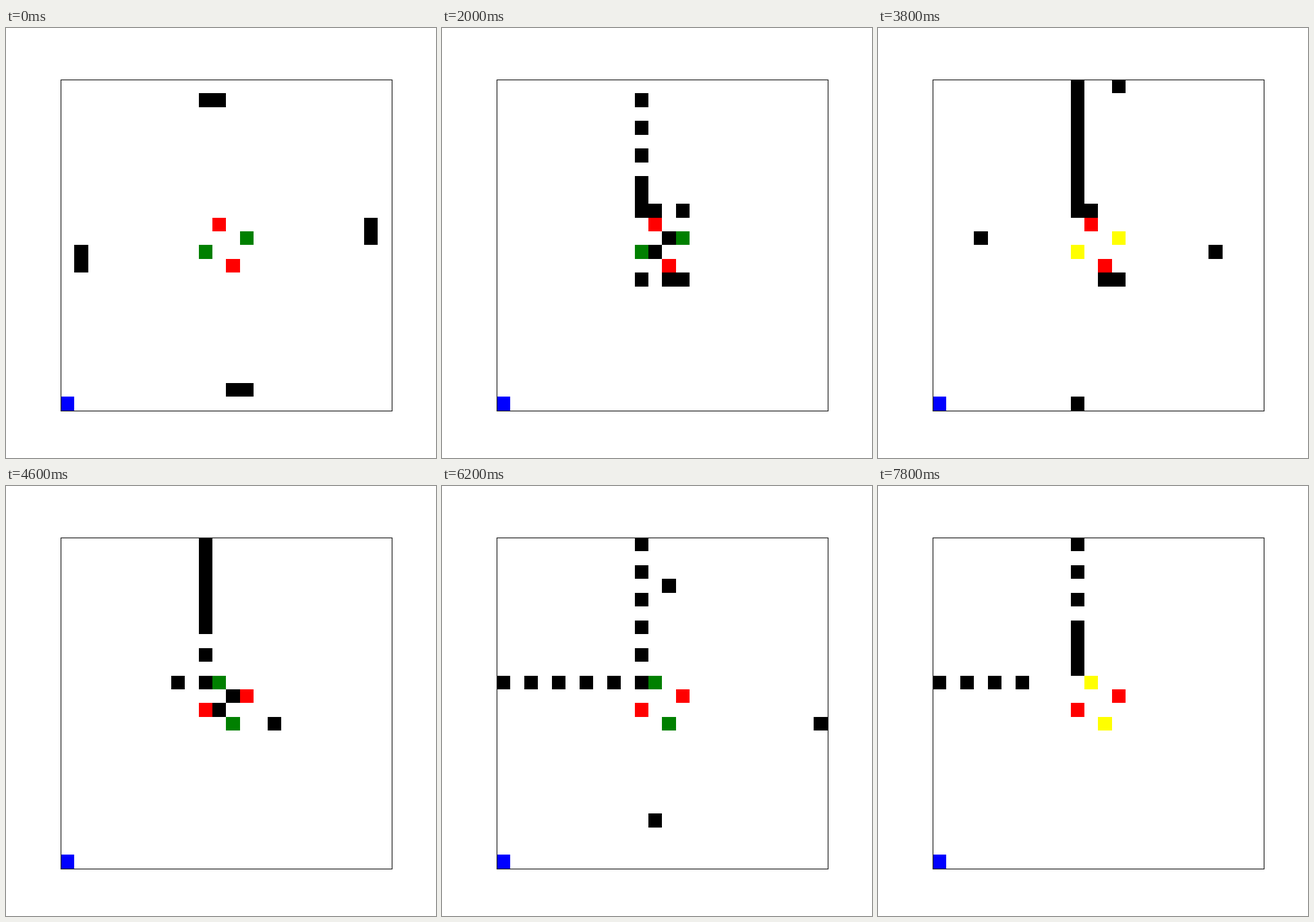
Recreate the animation shown at these times as a matplotlib script. Size 700x700 px, loop 8000 ms.

```python
import numpy as np
import matplotlib.pyplot as plt
from matplotlib.animation import FuncAnimation
from matplotlib.colors import ListedColormap

N = 24              # cells per side
STEPS = 40
STOP = 9            # last cell before the crossing
HALF, GREEN_TIME = 20, 15

COLORS = ["white", "black", "red", "yellow", "green", "blue"]
EMPTY, CAR, RED, YELLOW, GREEN, MARK = range(len(COLORS))


def rotate(cell, turns):
    x, y = cell
    for _ in range(turns):
        x, y = N - 1 - y, x
    return x, y


# Lanes for traffic entering from the top; the other arms are rotations.
STRAIGHT = [(11, i) for i in range(N)]
TURN = [(10, i) for i in range(11)] + [(i, 10) for i in range(9, -1, -1)]
LIGHT = (11, 10)

LANES = [(arm, [rotate(c, arm) for c in path])
         for arm in range(4) for path in (TURN, STRAIGHT)]
BUSY_LANE = 0       # the only lane that keeps receiving cars


def light_state(arm, step):
    """Arms 1 and 3 have the first green phase, arms 0 and 2 the second."""
    phase, t = divmod(step, HALF)
    if phase % 2 == arm % 2:
        return RED
    return GREEN if t < GREEN_TIME else YELLOW


def advance(cars, length, is_green, refill):
    moved = set()
    for p in cars:
        blocked = p + 1 in cars or (p == STOP and not is_green)
        p = p if blocked else p + 1
        if p < length:
            moved.add(p)
    if refill and 0 not in cars:
        moved.add(0)
    return moved


def paint(traffic, step):
    grid = np.full((N, N), EMPTY)
    for (_, path), cars in zip(LANES, traffic):
        for p in cars:
            x, y = path[p]
            grid[y, x] = CAR
    for arm in range(4):
        x, y = rotate(LIGHT, arm)
        grid[y, x] = light_state(arm, step)
    grid[N - 1, 0] = MARK
    return grid


def simulate():
    traffic = [{1} for _ in LANES]
    grids = []
    for step in range(STEPS):
        grids.append(paint(traffic, step))
        traffic = [
            advance(cars, len(path), light_state(arm, step) == GREEN,
                    lane == BUSY_LANE)
            for lane, ((arm, path), cars) in enumerate(zip(LANES, traffic))
        ]
    return grids


grids = simulate()

fig, ax = plt.subplots(figsize=(7, 7), dpi=100)
ax.set_xticks([])
ax.set_yticks([])
image = ax.imshow(grids[0], cmap=ListedColormap(COLORS), vmin=-0.5,
                  vmax=len(COLORS) - 0.5, interpolation="nearest")


def update(step):
    image.set_data(grids[step])
    return (image,)


anim = FuncAnimation(fig, update, frames=STEPS, interval=200,
                     repeat=True, repeat_delay=0)
plt.show()
```
